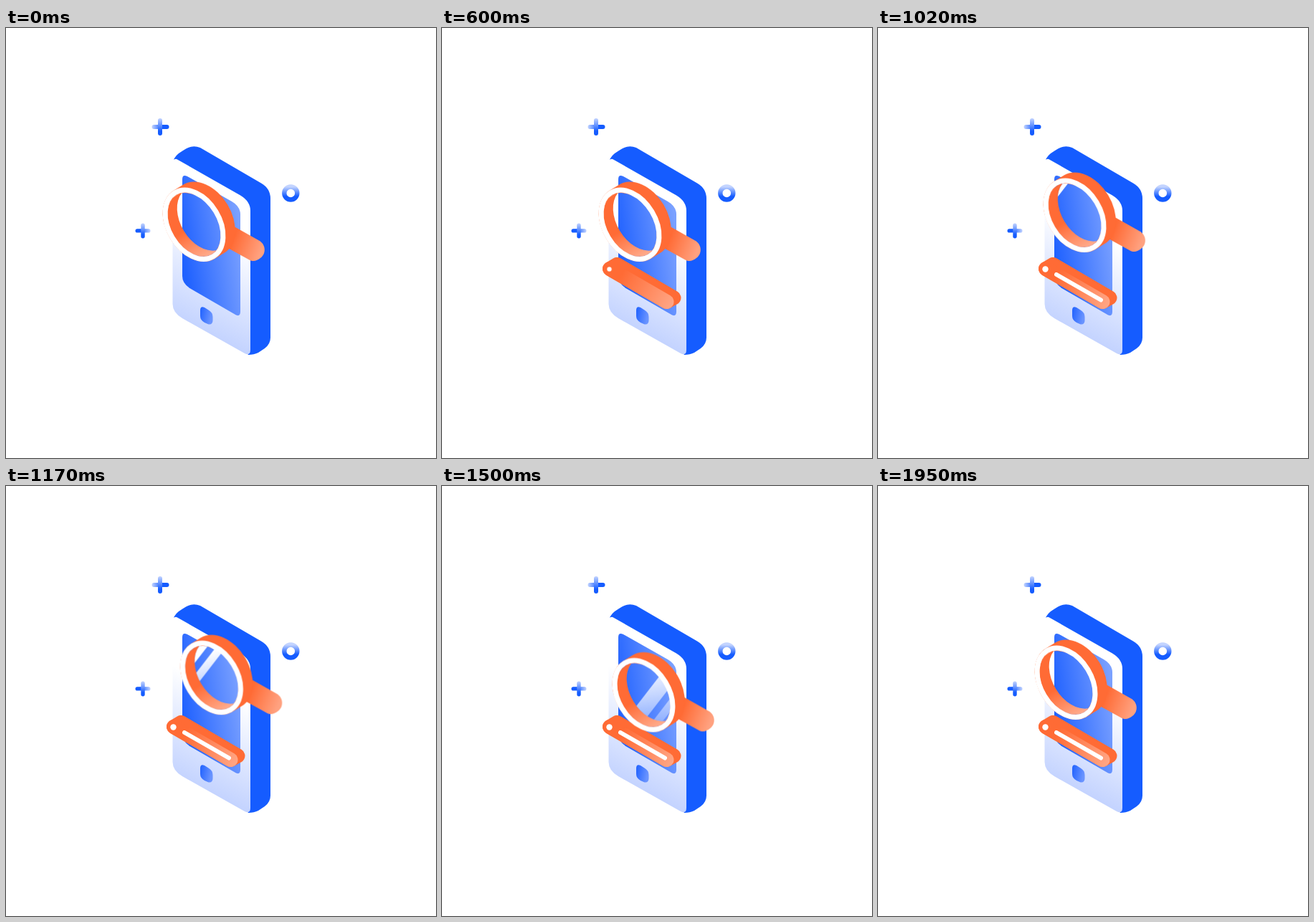
These frames come from a looping animation (600 by 600 pixels, 2700 ms). An HTML page:

```html
<!DOCTYPE html>
<html lang="en">
<head>
<meta charset="utf-8">
<title>Mobile search</title>
<style>
html, body { margin: 0; width: 100%; height: 100%; overflow: hidden; background: #fff; }
svg { display: block; width: 100vw; height: 100vh; }

.orbit, .sheen, .bar, .hull, .plate, .dot, .line { animation: 2.7s linear infinite; }
.orbit { animation-name: orbit; }
.sheen { animation-name: sheen; }
.bar { animation-name: pop; transform-origin: 285px 352px; }
.hull { animation-name: extrude; }
.plate { animation-name: slide; }
.dot { animation-name: dot; transform-origin: 233.5px 336.5px; }
.line { animation-name: draw; stroke-dasharray: 1 2; }

/* the lens circles once around a point to its right */
@keyframes orbit {
  0%, 23.333% { transform: rotate(190.7deg) translate(13.44px) rotate(-190.7deg); animation-timing-function: cubic-bezier(.45, 0, .8, .7); }
  30% { transform: rotate(208.9deg) translate(14.5px) rotate(-208.9deg); }
  37.778% { transform: rotate(265.6deg) translate(15.5px) rotate(-265.6deg); }
  44.444% { transform: rotate(331deg) translate(14.4px) rotate(-331deg); }
  48.889% { transform: rotate(384.4deg) translate(15.7px) rotate(-384.4deg); animation-timing-function: cubic-bezier(.3, .5, .7, .9); }
  56.667% { transform: rotate(432deg) translate(16px) rotate(-432deg); }
  63.333% { transform: rotate(466deg) translate(15.1px) rotate(-466deg); animation-timing-function: cubic-bezier(.25, .3, .5, 1); }
  72.222%, 100% { transform: rotate(550.7deg) translate(13.44px) rotate(-550.7deg); }
}
@keyframes sheen {
  0%, 34.444% { transform: translate(-50.2px, -38.8px); }
  66.667%, 100% { transform: translate(61.6px, 47.6px); }
}
@keyframes pop {
  0%, 4.444% { transform: scale(0); animation-timing-function: ease-out; }
  10% { transform: scale(1.28); animation-timing-function: ease-in-out; }
  14.444%, 100% { transform: scale(1); }
}
@keyframes extrude {
  0%, 15.2% { d: path("M244 330L323.5 376.5L323.5 376.5L244 330Z"); animation-timing-function: ease-out; }
  22.222%, 100% { d: path("M244 330L323.5 376.5L313.5 382L234 336Z"); }
}
@keyframes slide {
  0%, 15.2% { transform: translate(10px, -6px); opacity: 0; animation-timing-function: ease-out; }
  22.222%, 100% { transform: none; opacity: 1; }
}
@keyframes dot {
  0%, 19% { transform: scale(0); }
  23.333%, 100% { transform: scale(1); }
}
@keyframes draw {
  0%, 23.3% { stroke-dashoffset: 1; opacity: 0; }
  23.333% { stroke-dashoffset: 1; opacity: 1; animation-timing-function: cubic-bezier(0, 0, .35, 1); }
  33.333%, 100% { stroke-dashoffset: 0; opacity: 1; }
}
</style>
</head>
<body>
<svg viewBox="0 0 600 600">
  <defs>
    <linearGradient id="right"><stop stop-color="#c3d4ff"/><stop offset=".6" stop-color="#155cff"/></linearGradient>
    <linearGradient id="left"><stop offset=".35" stop-color="#155cff"/><stop offset="1" stop-color="#c3d4ff"/></linearGradient>
    <linearGradient id="down" x2="0" y2="1"><stop stop-color="#c3d4ff"/><stop offset=".75" stop-color="#155cff"/></linearGradient>
    <linearGradient id="face" gradientUnits="userSpaceOnUse" x1="238" y1="408" x2="301" y2="285">
      <stop stop-color="#c2d2ff"/><stop offset="1" stop-color="#fff"/>
    </linearGradient>
    <linearGradient id="screen" gradientUnits="userSpaceOnUse" x1="246" y1="312" x2="330" y2="300">
      <stop stop-color="#1f61ff"/><stop offset="1" stop-color="#7ba1ff"/>
    </linearGradient>
    <linearGradient id="button" x2="1" y2=".3"><stop stop-color="#1f61ff"/><stop offset="1" stop-color="#6a94ff"/></linearGradient>
    <linearGradient id="handle" gradientUnits="userSpaceOnUse" x1="318" y1="292" x2="357" y2="307">
      <stop stop-color="#ff6b35"/><stop offset="1" stop-color="#ffa17f"/>
    </linearGradient>
    <linearGradient id="wall" gradientUnits="userSpaceOnUse" x1="0" y1="0" x2="0" y2="48">
      <stop stop-color="#ff6b35"/><stop offset="1" stop-color="#ffac8d"/>
    </linearGradient>
    <linearGradient id="plate" gradientUnits="userSpaceOnUse" x1="250" y1="345" x2="322" y2="387">
      <stop stop-color="#ff6b35"/><stop offset="1" stop-color="#ffa685"/>
    </linearGradient>
    <linearGradient id="shine" gradientUnits="userSpaceOnUse" x1="-12" y1="-32" x2="18" y2="42">
      <stop stop-color="#fff"/><stop offset="1" stop-color="#fff" stop-opacity=".3"/>
    </linearGradient>
    <clipPath id="hole">
      <path transform="rotate(-31)" d="M7.85-46.58A32.5 48 0 0 0 7.85 46.58A32.5 48 0 0 0 7.85-46.58Z"/>
    </clipPath>
    <mask id="stripes" maskUnits="userSpaceOnUse" x="-70" y="-70" width="140" height="140">
      <g class="sheen">
        <g transform="rotate(37.7)" fill="#fff">
          <rect x="-28" y="-90" width="21" height="180"/>
          <rect x="3" y="-90" width="11" height="180"/>
        </g>
      </g>
    </mask>
  </defs>

  <!-- ornaments -->
  <rect x="203.5" y="135" width="24" height="6" rx="3" fill="url(#right)"/>
  <rect x="212" y="126" width="6" height="24" rx="3" fill="url(#down)"/>
  <rect x="180.5" y="280.2" width="21" height="5.4" rx="2.7" fill="url(#left)"/>
  <rect x="188.3" y="272.5" width="5.4" height="21" rx="2.7" fill="url(#down)"/>
  <circle cx="397.3" cy="230.5" r="9" fill="none" stroke="url(#down)" stroke-width="6.4"/>

  <!-- phone -->
  <path fill="#155cff" d="M234 185Q235 178 247 171Q259 162 271 167L356 216.500Q369 224 369 238V432Q369 441 361 447L352 453Q346 456 338 456L300 400Z"/>
  <path fill="url(#face)" d="M232.500 190Q233 180 240 184L327 233.500Q341 242 341 255V449Q341 458 333 454L246 405Q232.500 397 232.500 385Z"/>
  <path fill="url(#screen)" d="M246 211Q246 203.500 253 207L315 242Q327 249 327 260V396Q327 403 321 400.500L258 364Q246 357 246 346Z"/>
  <path fill="url(#button)" d="M271 394Q271 387.500 277 390L282.500 393.500Q288.500 397 288.500 403V408Q288.500 414.500 282 413.300L277 411Q271 407.500 271 402Z"/>

  <!-- search bar -->
  <g class="bar">
    <path class="hull" fill="#ff6b35" stroke="#ff6b35" stroke-width="20" stroke-linejoin="round" d="M244 330L323.500 376.500L313.500 382L234 336Z"/>
    <g class="plate" stroke-linecap="round">
      <path stroke="url(#plate)" stroke-width="20" d="M234 336L313.500 382"/>
      <circle class="dot" cx="233.5" cy="336.500" r="4.200" fill="#fff"/>
      <path class="line" pathLength="1" stroke="#fff" stroke-width="6" d="M249 344L311 379.500"/>
    </g>
  </g>

  <!-- magnifier -->
  <g transform="translate(13.2 2.500)">
    <g class="orbit">
      <path fill="url(#handle)" d="M314 274.500L353 296.500C363 302 363 315 355.500 320.500C350 325 345 326.500 339.500 323.500L306 305Z"/>
      <g transform="translate(262.500 274.300)">
        <g transform="rotate(-31)">
          <path fill="#ff6b35" fill-rule="evenodd" d="M0-55.600A38.700 55.600 0 0 0 0 55.600H15.700A38.700 55.600 0 0 0 15.700-55.600ZM0-48A32.500 48 0 0 0 0 48A32.500 48 0 0 0 0-48Z"/>
          <path fill="url(#wall)" d="M7.850-46.580A32.500 48 0 1 0 7.850 46.580A32.500 48 0 0 1 7.850-46.580Z"/>
        </g>
        <g clip-path="url(#hole)">
          <rect x="-60" y="-60" width="120" height="120" fill="url(#shine)" mask="url(#stripes)"/>
        </g>
        <ellipse transform="rotate(-31)" rx="35.400" ry="51.900" fill="none" stroke="#fff" stroke-width="7"/>
      </g>
    </g>
  </g>
</svg>
</body>
</html>
```
